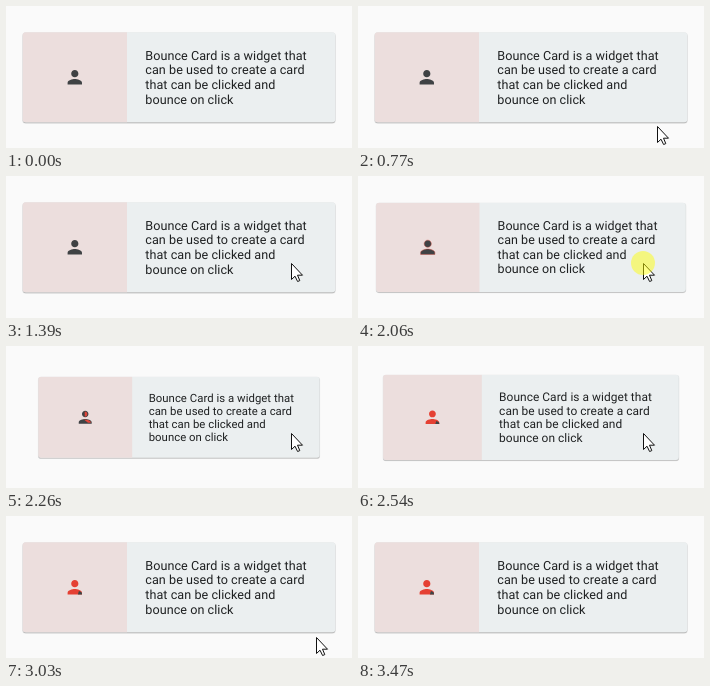
An HTML page that plays this animation: 346 px wide and 142 px high, repeating every 3730 ms.

```html
<!DOCTYPE html>
<html lang="en">
<head>
<meta charset="utf-8">
<title>Bounce Card</title>
<style>
  html, body { margin: 0; width: 100%; height: 100%; overflow: hidden; background: #fafafa; }
  svg { display: block; width: 346px; height: 142px; }
  text { font: 12.6px Roboto, Arial, sans-serif; letter-spacing: .05px; fill: #1f2122; text-rendering: geometricPrecision; }
</style>
</head>
<body>
<svg viewBox="0 0 346 142">
  <defs>
    <clipPath id="round"><rect x="16.7" y="26.3" width="312.6" height="90" rx="3"/></clipPath>
  </defs>
  <g id="card">
    <rect x="16.2" y="26.3" width="313.6" height="91.4" rx="3.5" fill-opacity=".07"/>
    <rect x="16.7" y="27" width="312.6" height="90.2" rx="3" fill-opacity=".2"/>
    <g clip-path="url(#round)">
      <rect x="16" y="26" width="314" height="91" fill="#ebeff0"/>
      <rect x="16" y="26" width="105" height="91" fill="#ecdedd"/>
    </g>
    <g transform="translate(58 60.5) scale(.9)">
      <path id="person" d="M12 12c2.21 0 4-1.79 4-4s-1.79-4-4-4-4 1.79-4 4 1.79 4 4 4zm0 2c-2.67 0-8 1.34-8 4v2h16v-2c0-2.66-5.33-4-8-4z"/>
      <path id="core" fill="#e0453a" d="M11.4 4.8a3.2 3.2 0 1 1 0 6.4zM10.4 14.6q6 0 8.4 3v1h-3.4z"/>
      <path id="corner" fill="#3d4647" d="M16.6 16.2q3.4 1 3.4 2.6v1.2h-4.6z"/>
    </g>
    <text x="139.3" y="53.8">Bounce Card is a widget that</text>
    <text x="139.3" y="68.4">can be used to create a card</text>
    <text x="139.3" y="83">that can be clicked and</text>
    <text x="139.3" y="97.6">bounce on click</text>
  </g>
  <path id="cursor" d="M.5.5V16.5L4 13.2L6.6 18.5L8.8 17.6L6.5 12.2H11.5Z" fill="#fff" stroke="#111" stroke-width="1" stroke-linejoin="round"/>
  <circle id="tap" cx="285" cy="87" r="12" fill="#ff0" fill-opacity=".47"/>
</svg>
<script>
const LOOP = 3730, DARK = '#3f4244', RED = '#e54033';
const el = Object.fromEntries(
  ['card', 'person', 'core', 'corner', 'tap', 'cursor'].map(id => [id, document.getElementById(id)]));
const show = (node, on) => node.setAttribute('visibility', on ? 'visible' : 'hidden');
const mix = (a, b, p) => a + (b - a) * p;

// Progress 0..1 in n held steps; the first step lands at a, the last at b.
function steps(t, a, b, n) {
  if (t < a) return 0;
  return Math.min(1, (Math.floor((t - a) * (n - 1) / (b - a) + 1e-6) + 1) / n);
}

function pointer(t) {
  if (t < 460 || t >= 3470) return null;
  if (t < 990) {
    const p = steps(t, 460, 950, 14);
    return [mix(305, 291, p ** 2.1), mix(141, 95, p ** 1.77)];
  }
  if (t < 2880) {
    const p = 1 - (1 - steps(t, 990, 1390, 8)) ** 2;
    return [mix(291, 285, p), mix(95, 87, p)];
  }
  if (t < 3290) {
    const p = steps(t, 2880, 3050, 6);
    return [mix(285, 315, p), mix(87, 128, p)];
  }
  return [315, mix(128, 143, steps(t, 3290, 3470, 4))];
}

function scale(t) {
  if (t < 2060) return 1;
  if (t < 2460) {
    const held = [2260, 2220, 2190, 2150, 2060].find(s => t >= s);
    return 1 - .1 * (held - 2040) / 220;
  }
  const held = 2460 + Math.floor(Math.min(180, t - 2460) / 36) * 36;
  return .9 + .1 * (held - 2440) / 200;
}

function draw(t) {
  el.card.setAttribute('transform', `translate(173 71.4) scale(${scale(t)}) translate(-173 -71.4)`);

  const red = t >= 2460;
  el.person.setAttribute('fill', red ? RED : DARK);
  el.person.setAttribute('stroke', t >= 2060 && t < 2150 ? '#c8463c' : 'none');
  el.person.setAttribute('stroke-width', .5);
  show(el.core, t >= 2150 && !red);
  show(el.corner, red);

  show(el.tap, t >= 1890 && t < 2150);
  const at = pointer(t);
  show(el.cursor, at);
  if (at) el.cursor.setAttribute('transform', `translate(${at.map(Math.round)})`);
}

const start = performance.now();
function tick() {
  draw((performance.now() - start) % LOOP);
  requestAnimationFrame(tick);
}
tick();
</script>
</body>
</html>
```
